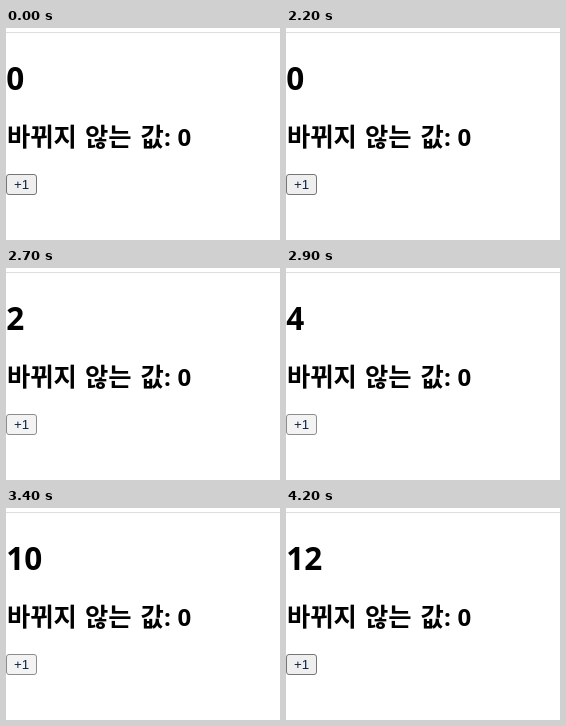
Recreate the animation shown at these times as an HTML page. Size 274 by 212 pixels, loop 4.6 s.

```html
<!DOCTYPE html>
<html lang="ko">
<head>
<meta charset="utf-8">
<style>
  html, body { margin: 0; width: 100%; height: 100%; overflow: hidden; background: #fff; }
  svg { display: block; }
  .bold { font-family: "Open Sans", "Noto Sans", sans-serif; font-weight: 700; }
  .hangul { font: 700 25.3px "Noto Sans CJK KR", "Noto Sans CJK", sans-serif; }
  #button rect { fill: #efefef; stroke: #767676; }
  #button text { font: 13.333px "Liberation Sans", Arial, sans-serif; fill: #0c2344; }
  #button.pressed rect { fill: #f3f3f3; stroke: #8d8d8d; }
</style>
</head>
<body>
<svg width="274" height="212" viewBox="0 0 274 212">
  <path d="M0 4.5H274" stroke="#dedede"/>
  <text id="count" class="bold" x=".3" y="62" font-size="31.5">0</text>
  <g class="hangul">
    <text x="1" y="118">바뀌지</text>
    <text x="79" y="118">않는</text>
    <text x="134.5" y="118">값</text>
  </g>
  <text class="bold" x="158" y="118" font-size="24">:</text>
  <text class="bold" x="171.5" y="118" font-size="24">0</text>
  <g id="button">
    <rect x=".5" y="146.5" width="30" height="20" rx="2.5"/>
    <text x="8" y="161">+1</text>
  </g>
</svg>
<script>
  const LOOP = 4600, STEP = 100, CLICKS_FROM = 2600, RELEASE_AT = 4200, LAST_VALUE = 12;
  const count = document.getElementById("count");
  const button = document.getElementById("button");
  const start = performance.now();

  // Clicks come slightly faster than the picture refreshes, so some values are skipped.
  function valueAt(time) {
    if (time < CLICKS_FROM) return 0;
    const step = Math.floor((time - CLICKS_FROM) / STEP);
    return Math.min(LAST_VALUE, Math.floor(1.35 + 1.2 * step));
  }

  function draw(now) {
    const time = Math.max(0, now - start) % LOOP;
    count.textContent = valueAt(time);
    button.classList.toggle("pressed", time >= CLICKS_FROM && time < RELEASE_AT);
    requestAnimationFrame(draw);
  }
  draw(start);
</script>
</body>
</html>
```
